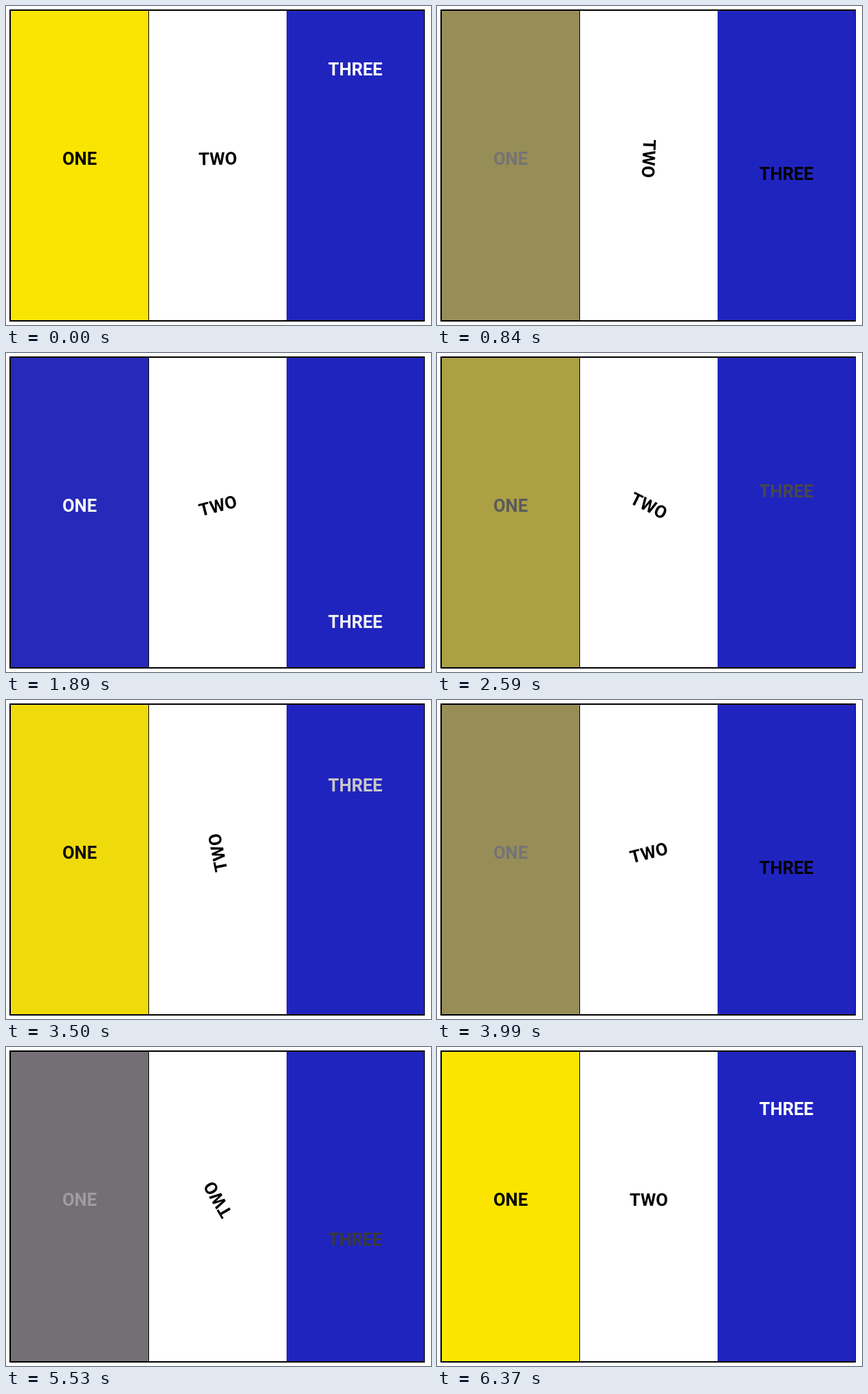
An HTML page for the animation above (6440 ms loop, 618x464 px).

```html
<!DOCTYPE html>
<html lang="en">
<head>
<meta charset="utf-8">
<title>One Two Three</title>
<style>
  html, body { margin: 0; width: 100%; height: 100%; overflow: hidden; background: #fff; }
  svg { display: block; width: 618px; height: 464px; }
  text { font: bold 25.5px Roboto, "Open Sans", sans-serif; text-anchor: middle; }
</style>
</head>
<body>
<svg viewBox="0 0 618 464">
  <rect x="5" y="5" width="604" height="454" fill="#000"/>
  <rect id="panel" x="7" y="7" width="200" height="450"/>
  <rect x="208" y="7" width="200" height="450" fill="#fff"/>
  <rect x="408" y="7" width="200" height="450" fill="#2024bf"/>
  <text id="one" x="107" y="231">ONE</text>
  <text id="two" x="308" y="231">TWO</text>
  <text id="three" x="508">THREE</text>
</svg>
<script>
const LOOP = 6440, STEP = 70, OFFSET = 88;
const SPIN = 2100, SWING = 3150, HALF = SWING / 2, PAUSE = 45;
const YELLOW = [251, 229, 0], BLUE = [32, 36, 191];
const BLACK = [0, 0, 0], WHITE = [255, 255, 255];
const TOP = 90, BOTTOM = 400, CAP_HALF = 9;

const [panel, one, two, three] =
  ['panel', 'one', 'two', 'three'].map(id => document.getElementById(id));

const clamp = u => Math.min(1, Math.max(0, u));
const ease = u => u < 0.5 ? 2 * u * u : 1 - 2 * (1 - u) ** 2;
const mix = (a, b, k) => a + (b - a) * k;
const blend = (a, b, k) => `rgb(${a.map((v, i) => Math.round(mix(v, b[i], k)))})`;
const phase = (t, period) => (t - OFFSET + period) % period;

function draw(t) {
  const s = phase(t, SWING);
  const back = 1 - ease(clamp((s - HALF - PAUSE) / (HALF - PAUSE)));
  const goingOut = s < HALF;

  const fade = goingOut ? ease(s / HALF) : back;
  panel.setAttribute('fill', blend(YELLOW, BLUE, fade));
  one.setAttribute('fill', blend(BLACK, WHITE, fade));

  const angle = 360 * ease(phase(t, SPIN) / SPIN);
  two.setAttribute('transform', `rotate(${angle} 308 222)`);

  // The way down slows at the middle; the way up is one sweep.
  const q = 2 * s / HALF;
  const drop = goingOut ? (Math.floor(q) + ease(q % 1)) / 2 : back;
  three.setAttribute('y', mix(TOP, BOTTOM, drop) + CAP_HALF);
  three.setAttribute('fill', blend(BLACK, WHITE, Math.abs(1 - 2 * drop)));
}

function tick() {
  const t = performance.now() % LOOP;
  draw(Math.floor(t / STEP) * STEP);
  requestAnimationFrame(tick);
}
draw(0);
requestAnimationFrame(tick);
</script>
</body>
</html>
```
